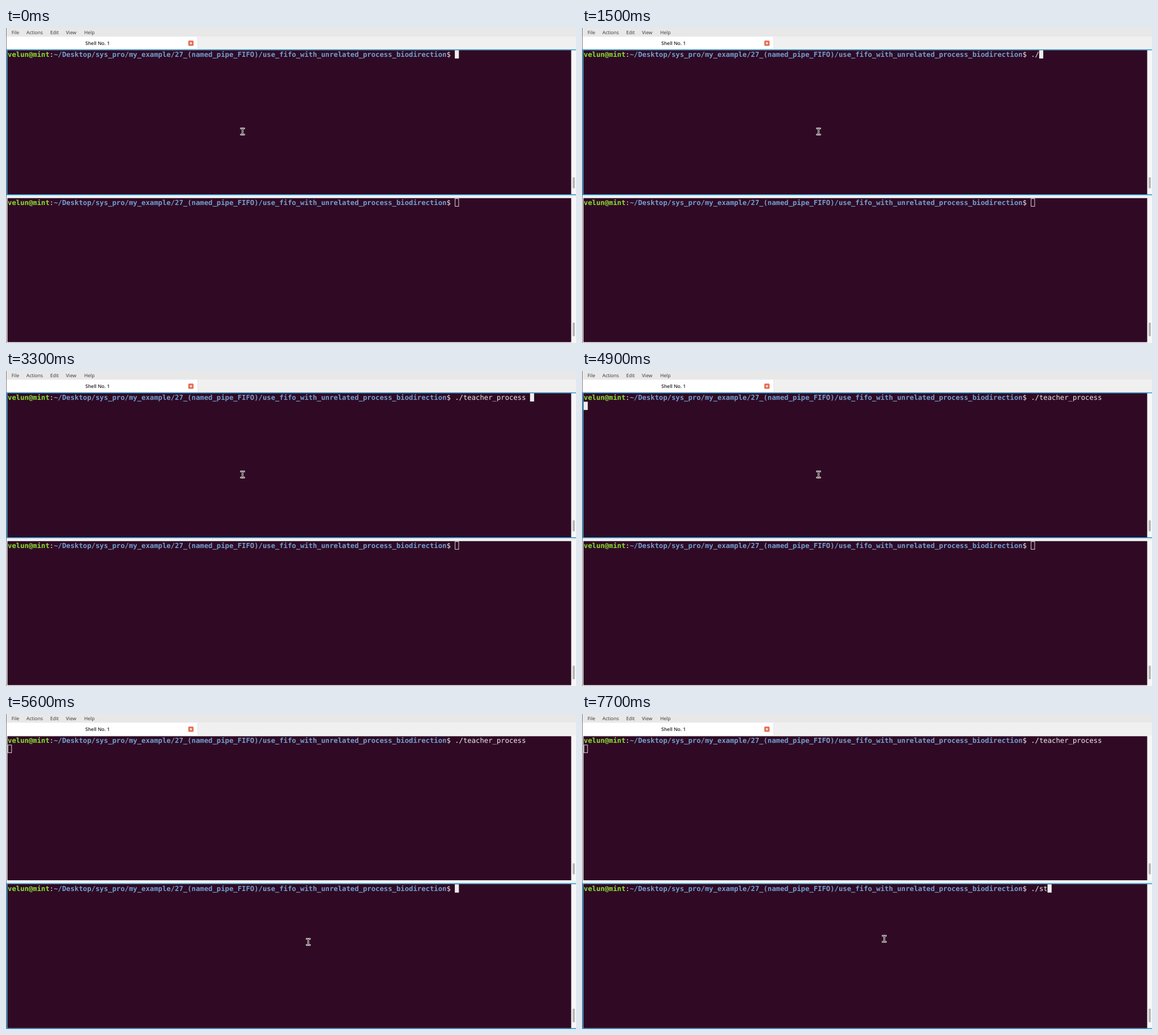
Write an HTML page with a canvas that moves like this. It is 1006 px wide and 557 px high and loops after 8000 ms.

```html
<!DOCTYPE html>
<html lang="en">
<head>
<meta charset="utf-8">
<title>Split terminal</title>
<style>
  html, body { margin: 0; width: 100%; height: 100%; overflow: hidden; background: #f0f0f0; }
  canvas { display: block; }
</style>
</head>
<body>
<canvas id="stage" width="1006" height="557"></canvas>
<script>
const ctx = document.getElementById('stage').getContext('2d');
const LOOP = 8000, CELL = 7.375, LINE = 15, LEFT = 3;
const BACK = '#300a24', LIGHT = '#eeeeec', ACCENT = '#1c97d4';
const MONO = '12.25px "DejaVu Sans Mono", monospace';
const UI = '8.5px "Open Sans", sans-serif';
const USER = 'velun@mint';
const DIR = '~/Desktop/sys_pro/my_example/27_(named_pipe_FIFO)/use_fifo_with_unrelated_process_biodirection';
const PROMPT_END = USER.length + DIR.length + 3;
const FOCUS_TIME = 5600, ENTER_TIME = 4900;

// Each entry: time of the keystroke, text after it.
const TOP_TYPING = [[0, ''], [1100, '.'], [1500, './'], [3000, './t'], [3300, './teacher_process ']];
const BOTTOM_TYPING = [[0, ''], [6300, '.'], [6600, './'], [7400, './s'], [7700, './st']];

const typed = (keys, t) => keys.filter(([at]) => at <= t).pop()[1];

function rect(x, y, w, h, color) {
  ctx.fillStyle = color;
  ctx.fillRect(x, y, w, h);
}

function text(str, x, y, color, font) {
  ctx.font = font;
  ctx.fillStyle = color;
  ctx.fillText(str, x, y);
}

function strokePath(d, color, width) {
  ctx.strokeStyle = color;
  ctx.lineWidth = width;
  ctx.stroke(new Path2D(d));
}

function drawWindow() {
  rect(0, 0, 1006, 557, '#f0f0f0');
  rect(0, 0, 1006, 15, '#e8e8e8');
  rect(1, 15.5, 337, 22, '#fff');
  rect(338, 16, 0.6, 21, '#dcdcdc');
  const menu = { File: 9.7, Actions: 36, Edit: 78, View: 105.8, Help: 138 };
  for (const name in menu) text(name, menu[name], 11.3, '#333', UI);
  text('Shell No. 1', 140, 30, '#222', '600 ' + UI);

  ctx.fillStyle = '#e66a50';
  ctx.beginPath();
  ctx.roundRect(321.7, 22.2, 9.3, 9.3, 1.5);
  ctx.fill();
  strokePath('M324.6 25.1l3.6 3.6m0-3.6l-3.6 3.6', '#fff', 1.2);
  rect(0, 0, 0.8, 557, '#5c5c5c');
}

function drawPane(top, bottom, handleY, handleH, active) {
  rect(1, top - 1, 1005, bottom - top + 2, '#f7f7f7');
  if (active) {
    rect(1, top - 1.5, 1005, 1.5, ACCENT);
    rect(1, bottom, 1005, 1.5, ACCENT);
    rect(1, top, 1.5, bottom - top, ACCENT);
  }
  rect(2.5, top, 995, bottom - top, BACK);
  ctx.fillStyle = '#b9b9b9';
  ctx.beginPath();
  ctx.roundRect(1000, handleY, 4, handleH, 1);
  ctx.fill();
}

function drawShell(top, input, active, entered) {
  const base = top + 11.5;
  const put = (str, col, color, bold = '') => text(str, LEFT + col * CELL, base, color, bold + MONO);
  put(USER, 0, '#8ae234', 'bold ');
  put(':', USER.length, LIGHT);
  put(DIR, USER.length + 1, '#729fcf', 'bold ');
  put('$ ' + input, PROMPT_END - 2, LIGHT);

  const x = entered ? LEFT : LEFT + (PROMPT_END + input.length) * CELL;
  const y = entered ? top + LINE : top;
  if (active) {
    rect(x, y, 7.2, 14.6, LIGHT);
  } else {
    ctx.strokeStyle = LIGHT;
    ctx.lineWidth = 0.9;
    ctx.strokeRect(x + 0.5, y + 0.5, 6.3, 13.6);
  }
}

function drawPointer(t) {
  const step = Math.max(0, Math.min(5, Math.floor((t - 5000) / 100))) / 5;
  const p = step * step * (3 - 2 * step);
  ctx.save();
  ctx.translate(417.5 + 116 * p, 183 + 220 * p - (t >= 5700 ? 5.5 : 0));
  const beam = 'M-2.7-5.3h1.7l1 1 1-1h1.7M-2.7 5.3h1.7l1-1 1 1h1.7M0-4.3v8.6';
  ctx.lineCap = 'square';
  strokePath(beam, '#fff', 2.7);
  strokePath(beam, '#111', 1);
  ctx.restore();
}

function draw(t) {
  const topActive = t < FOCUS_TIME;
  drawWindow();
  drawPane(39.3, 294, 264, 19.5, topActive);
  drawPane(300.8, 555.5, 521, 24, !topActive);
  drawShell(39.3, typed(TOP_TYPING, t), topActive, t >= ENTER_TIME);
  drawShell(301.2, typed(BOTTOM_TYPING, t), !topActive, false);
  drawPointer(t);
}

ctx.textRendering = 'geometricPrecision';
const start = performance.now();
function tick() {
  draw((performance.now() - start) % LOOP);
  requestAnimationFrame(tick);
}
tick();
</script>
</body>
</html>
```
